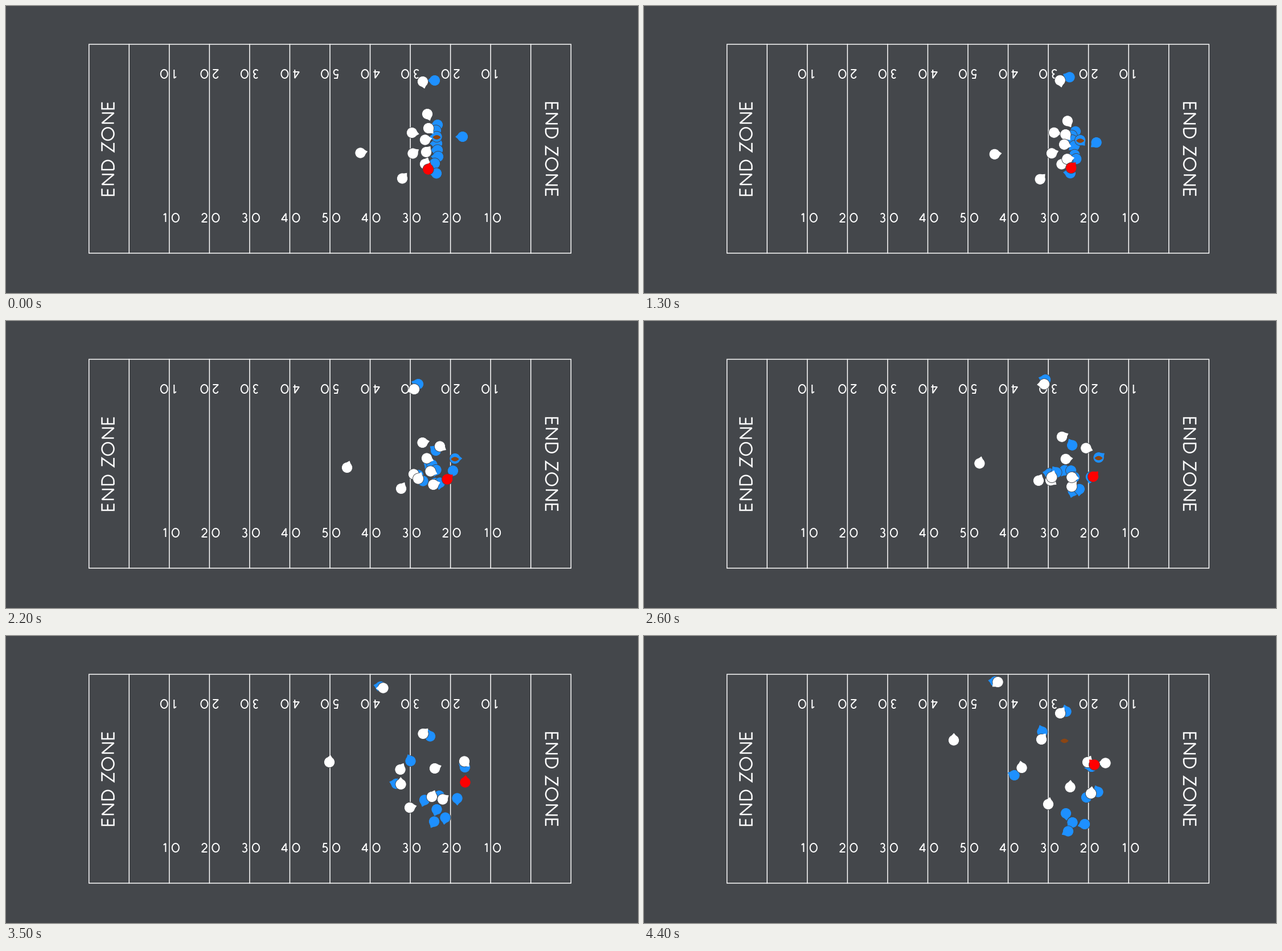
A matplotlib script that plays this animation: 1110 px wide and 505 px high, repeating every 4.5 s.

```python
import numpy as np
import matplotlib.pyplot as plt
from matplotlib.animation import FuncAnimation
from matplotlib.patches import Circle, Polygon, Rectangle

W, H, DPI = 1110, 505, 100
FRAMES, STEP_MS = 45, 100
BG, BLUE, WHITE, RED, BROWN = "#44474b", "#1e90ff", "#ffffff", "#ff0000", "#8b4513"
PX = 72 / DPI
RADIUS, TIP = 9.6, 12.8
FULL_SPEED, THROW = 22, 39
LINE = dict(color=WHITE, snap=False, zorder=1)

fig = plt.figure(figsize=(W / DPI, H / DPI), dpi=DPI, facecolor=BG)
ax = fig.add_axes([0, 0, 1, 1])
ax.set_xlim(0, W)
ax.set_ylim(H, 0)
ax.axis("off")


# ---- lettering drawn as strokes, unit cap height, y up ----

def arc(cx, cy, rx, ry, start, end):
    a = np.radians(np.linspace(start, end, 40))
    return list(zip(cx + rx * np.cos(a), cy + ry * np.sin(a)))


GLYPHS = {
    "0": [arc(0, .5, .4, .5, 0, 360)],
    "1": [[(-.07, .82), (.17, 1), (.17, 0)]],
    "2": [arc(0, .7, .28, .3, 165, -38) + [(-.3, 0), (.33, 0)]],
    "3": [arc(0, .76, .23, .24, 150, -90) + arc(0, .26, .27, .26, 90, -150)],
    "4": [[(.15, 0), (.15, 1), (-.36, .26), (.34, .26)]],
    "5": [[(.26, 1), (-.12, 1), (-.2, .57)] + arc(0, .31, .29, .31, 128, -145)],
    "E": [[(.55, 1), (0, 1), (0, 0), (.55, 0)], [(0, .52), (.5, .52)]],
    "N": [[(0, 0), (0, 1), (.84, 0), (.84, 1)]],
    "D": [[(0, 0), (0, 1)] + arc(.27, .5, .5, .5, 90, -90) + [(0, 0)]],
    "Z": [[(.03, 1), (.7, 1), (0, 0), (.72, 0)]],
    "O": [arc(.52, .5, .52, .5, 0, 360)],
}


def draw_glyph(ch, offset, origin, size, angle, lw):
    """Place a glyph at an offset along a baseline turned clockwise by angle."""
    c, s = np.cos(np.radians(angle)), np.sin(np.radians(angle))
    for stroke in GLYPHS[ch]:
        u, v = np.array(stroke).T * size
        u, v = u + offset, -v
        ax.plot(origin[0] + u * c - v * s, origin[1] + u * s + v * c, lw=lw * PX,
                solid_capstyle="butt", solid_joinstyle="miter", **LINE)


def draw_field():
    left, top, right, bottom = 145.7, 67.4, 992.3, 434.9
    lines = np.linspace(left, right, 13)
    ax.add_patch(Rectangle((left, top), right - left, bottom - top, fill=False,
                           ec=WHITE, lw=1.5 * PX, snap=False, zorder=1))
    for x in lines[1:-1]:
        ax.plot([x, x], [top, bottom], lw=1.5 * PX, **LINE)
    for x, tens in zip(lines[2:-2], "123454321"):
        for ch, shift in ((tens, -10), ("0", 10)):
            draw_glyph(ch, shift, (x + 1, 380), 15, 0, 2)
            draw_glyph(ch, shift, (x + 1, 112), 15, 180, 2)
    for ch, pos in zip("ENDZONE", (1, 20, 46, 78, 98, 128, 153)):
        draw_glyph(ch, pos, (189.5, 334), 21, -90, 2.5)
        draw_glyph(ch, pos, (948, 169.5), 21, 90, 2.5)
    ax.axhline(H - .5, color="#303235", lw=PX)


# ---- motion ----

def progress(t):
    """Speed builds up until FULL_SPEED, then stays constant."""
    s = np.asarray(t, float) / FULL_SPEED
    return np.where(s < 1, s ** 2.5, 1 + 2.5 * (s - 1))


KNOTS = progress([0, FULL_SPEED, 35, 44])


def run(*stops):
    """Cubic path through the four stops, one point per frame."""
    u = progress(np.arange(FRAMES))
    powers = np.vander(KNOTS, 4)
    return np.vander(u, 4) @ np.linalg.solve(powers, np.array(stops, float))


def throw(passer, target):
    """Carried by the passer, raised before the throw, then a straight flight."""
    n = np.arange(FRAMES)[:, None]
    lift = np.clip((n - 29) / 6, 0, 1) * [-1, -9]
    flight = np.clip((n - THROW) / (FRAMES - 1 - THROW), 0, 1)
    return (passer + [0, 1] + lift) * (1 - flight) + np.array(target) * flight


class Player:
    """A disc whose nose blends its running direction with where it looks."""

    def __init__(self, color, path, look):
        self.path = path
        heading = np.gradient(path, axis=0) + look
        self.facing = np.arctan2(heading[:, 1], heading[:, 0])
        self.body = Circle((0, 0), RADIUS, fc=color, ec=BG, lw=.9 * PX, zorder=3)
        self.nose = Polygon(np.zeros((3, 2)), fc=color, lw=0, zorder=3)
        ax.add_patch(self.body)
        ax.add_patch(self.nose)

    def move(self, n):
        self.body.center = self.path[n]
        a = self.facing[n] + np.radians([-33, 0, 33])
        r = np.array([RADIUS - 1, TIP, RADIUS - 1])
        self.nose.set_xy(self.path[n] + np.c_[r * np.cos(a), r * np.sin(a)])


class Ball:
    def __init__(self, path):
        self.path = path
        u = np.linspace(-1, 1, 21)
        top = np.c_[7.2 * u, 3.8 * (1 - u * u)]
        self.shape = np.r_[top, -top]
        self.patch = Polygon(self.shape, fc=BROWN, lw=0, zorder=3)
        ax.add_patch(self.patch)

    def move(self, n):
        self.patch.set_xy(self.shape + self.path[n])


draw_field()

quarterback = run((756.5, 230), (788.5, 242), (806, 231), (786, 230))
ball = throw(quarterback, (738.5, 184.5))

ends = [
    run((753, 131), (724, 111), (658, 89), (617, 80)),
    run((758, 209), (755, 228), (745, 176.5), (741.5, 133)),
]
blocks = [
    [(743, 250), (735, 288.5), (741, 312)],
    [(748.5, 253), (761, 281), (777, 284)],
    [(755.5, 262), (756.5, 305), (752.5, 328)],
    [(754, 285), (752, 326.5), (745, 343.5)],
    [(762, 284.5), (771.5, 319.5), (774, 331)],
]
line = [run((755 + k, 219 + 11.5 * k), *stops) for k, stops in enumerate(blocks)]
backs = [
    run((753, 277), (724, 271), (685.5, 260), (650.5, 245)),
    run((756, 294.5), (732.5, 281.5), (710.5, 220), (699.5, 168.5)),
    run((802, 230), (785, 263.5), (792.5, 285.5), (797.5, 274.5)),
]
coverage = [
    run((622.5, 258.5), (599, 258), (568, 222), (544, 183.5)),
    run((732, 133), (717, 120), (662.5, 91.5), (621.5, 81)),
    run((740, 190), (762, 220.5), (805, 220.5), (810.5, 223.5)),
    run((713, 223), (731.5, 214), (732.5, 172), (731, 136)),
    run((714.5, 259.5), (716, 269.5), (709, 302), (710, 296)),
    run((696, 303.5), (694, 295), (692.5, 235), (698, 182)),
    run((736, 278), (724, 277.5), (693.5, 261), (663.5, 232)),
]
front = [
    run((742, 215), (739, 241.5), (753, 233), (779, 222)),
    run((738, 257), (750.5, 288), (748, 283), (748.5, 266)),
    run((736, 235.5), (745.5, 264.5), (767, 287.5), (785, 277)),
]
rusher = run((741.5, 287.5), (775, 278.5), (806.5, 257.5), (791, 226.5))


def watch(path):
    gap = ball - path
    return 3 * gap / np.linalg.norm(gap, axis=1, keepdims=True)


actors = [Player(BLUE, p, (-1, 0)) for p in ends + line + backs + [quarterback]]
actors.append(Ball(ball))
actors += [Player(WHITE, p, watch(p)) for p in coverage + front]
actors.append(Player(RED, rusher, watch(rusher)))


def update(n):
    for actor in actors:
        actor.move(n)
    return []


anim = FuncAnimation(fig, update, frames=FRAMES, init_func=lambda: update(0),
                     interval=STEP_MS, repeat=True, repeat_delay=0, blit=False)
plt.show()
```
